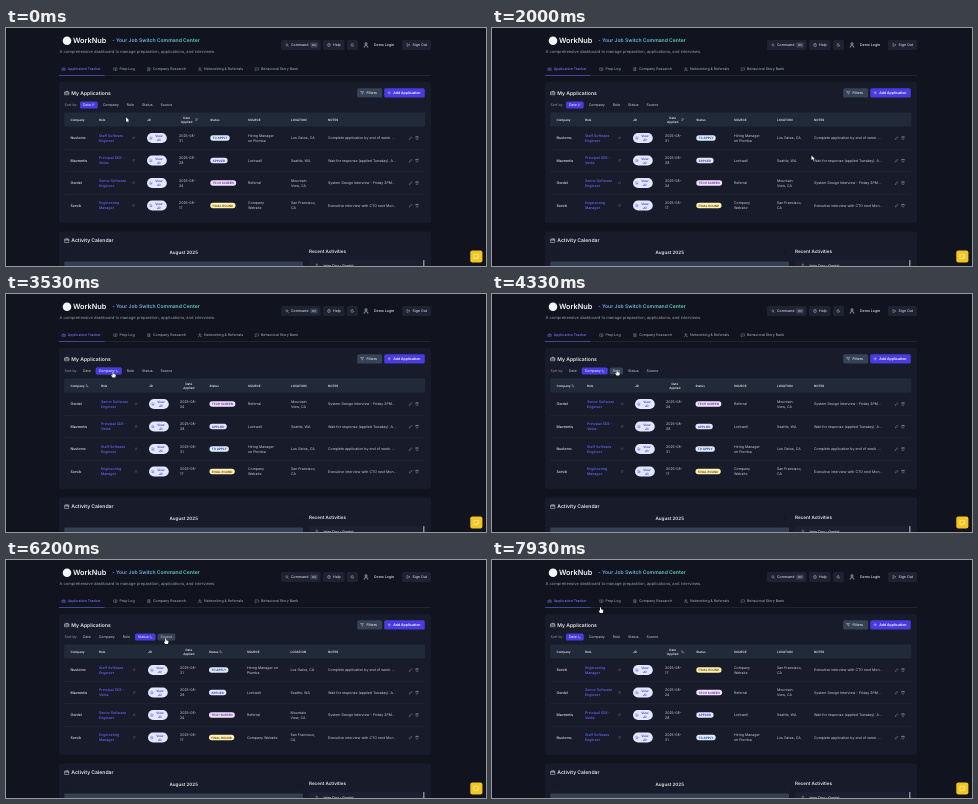
An HTML page with a canvas that plays this animation: 480 by 238 pixels, repeating every 8000 ms.

```html
<!DOCTYPE html>
<html lang="en">
<head>
<meta charset="utf-8">
<title>Application dashboard</title>
<style>
html, body { margin: 0; width: 100%; height: 100%; overflow: hidden; background: #11131f; }
canvas { display: block; width: 480px; height: 238px; }
</style>
</head>
<body>
<canvas id="stage"></canvas>
<script>
const W = 480, H = 238, LOOP = 8000;
const K = W / 1900; // stage pixels per interface pixel
const canvas = document.getElementById('stage');
const ctx = canvas.getContext('2d');
const dpr = window.devicePixelRatio || 1;
canvas.width = W * dpr;
canvas.height = H * dpr;

const C = {
  page: '#11131f', panel: '#181b29', head: '#212a39', button: '#1f2231', slate: '#364357',
  line: '#272b3b', text: '#e5e7eb', soft: '#cbd0da', muted: '#989fad',
  indigo: '#6668fa', add: '#4a3bdf'
};

const ICONS = {
  search: 'M11 4a7 7 0 1 0 0 14a7 7 0 1 0 0-14M16 16l5 5',
  help: 'M12 2a10 10 0 1 0 0 20a10 10 0 1 0 0-20M9 9q3-4 6 0q0 2-3 4M12 17v1',
  moon: 'M12 3a6 6 0 0 0 9 9a9 9 0 1 1-9-9',
  user: 'M12 3a4.5 4.5 0 1 0 0 9a4.5 4.5 0 1 0 0-9M5 21v-2q0-4 4-4h6q4 0 4 4v2',
  out: 'M9 21H4V3h5M16 17l5-5l-5-5M21 12H9',
  brief: 'M3 7h18v13H3zM8 7V4h8v3M3 13h18',
  book: 'M12 6v14M3 4h7l2 2l2-2h7v14h-7l-2 2l-2-2H3z',
  building: 'M6 3h12v18H6zM10 8h4M10 12h4M10 16h4',
  people: 'M9 4a4 4 0 1 0 0 8a4 4 0 1 0 0-8M2 21q0-6 7-6t7 6M16 4q4 4 0 8M19 15q3 2 3 6',
  chat: 'M3 4h18v13H8l-5 4z',
  filter: 'M3 4h18l-7 9v7l-4-2v-5z',
  plus: 'M12 5v14M5 12h14',
  link: 'M10 5H5v14h14v-5M14 4h6v6M20 4l-9 9',
  doc: 'M6 3h9l4 4v14H6zM9 13h6M9 17h6',
  pencil: 'M4 20l1-5L16 4l4 4L9 19z',
  trash: 'M3 6h18M6 6l1 15h10l1-15M9 6V3h6v3',
  calendar: 'M3 5h18v16H3zM3 10h18M8 2v5M16 2v5',
  left: 'M15 5l-7 7l7 7',
  right: 'M9 5l7 7l-7 7',
  asc: 'M7 21V4M4 7l3-3l3 3M14 15h3M14 20h7',
  desc: 'M7 3v17M4 17l3 3l3-3M14 4h7M14 9h3',
  note: 'M4 4h16v11l-5 5H4zM20 15h-5v5'
};
for (const name in ICONS) ICONS[name] = new Path2D(ICONS[name]);

// Columns shift a little with the sorted heading.
const COLUMNS = {
  Date: { role: 93, link: 127.5, jd: 141, date: 173, status: 204.3, source: 242, place: 285 },
  Company: { role: 95, link: 130, jd: 143, date: 174, status: 203.5, source: 242, place: 285 },
  Role: { role: 93, link: 129, jd: 143, date: 174, status: 203.5, source: 242, place: 285 },
  Status: { role: 93, link: 128, jd: 142, date: 174, status: 203, source: 241, place: 284.5 },
  Source: { role: 93, link: 128, jd: 142, date: 174, status: 203, source: 241, place: 284.5 }
};

const STATUS = [
  ['TO APPLY', '#dbeafe', '#1e3a8a'],
  ['APPLIED', '#e0e7ff', '#3730a3'],
  ['TECH SCREEN', '#eee2fd', '#6b21a8'],
  ['FINAL ROUND', '#fef4b2', '#713f12']
];

const JOBS = [
  { Company: 'Nuvlomo', Role: 'Staff Software|Engineer', Date: '2025-08-|31', Status: 0,
    Source: 'Hiring Manager|on Plomba', wide: 'Hiring Manager on|Plomba', place: 'Los Gatos, CA',
    notes: 'Complete application by end of week. ...' },
  { Company: 'Mavrentis', Role: 'Principal SDE -|Velda', Date: '2025-08-|28', Status: 1,
    Source: 'Lorkwell', place: 'Seattle, WA',
    notes: 'Wait for response (applied Tuesday). A...' },
  { Company: 'Gordel', Role: 'Senior Software|Engineer', Date: '2025-08-|24', Status: 2,
    Source: 'Referral', place: 'Mountain|View, CA',
    notes: 'System Design Interview - Friday 2PM...' },
  { Company: 'Sorvik', Role: 'Engineering|Manager', Date: '2025-08-|17', Status: 3,
    Source: 'Company|Website', wide: 'Company Website', place: 'San Francisco,|CA',
    notes: 'Executive interview with CTO next Mon...' }
];

const SORTS = [
  { at: -1000, key: 'Date', dir: -1 },
  { at: 3050, key: 'Company', dir: 1 },
  { at: 4600, key: 'Role', dir: 1 },
  { at: 5060, key: 'Status', dir: 1 },
  { at: 6450, key: 'Source', dir: 1 },
  { at: 7150, key: 'Date', dir: 1 }
];

// Pointer stops: time, x, y
const PATH = [
  [0, 120, 89.3], [300, 120, 89.3], [1000, 330.5, 130], [1900, 330.5, 130],
  [2650, 107, 78], [3700, 107, 78], [4200, 125, 76], [4750, 125, 76],
  [5000, 145, 79], [5700, 145, 79], [6100, 159.7, 78.3], [6600, 159.7, 78.3],
  [7000, 81, 78], [7500, 81, 78], [7900, 108.5, 47.3], [8000, 108.5, 47.3]
];

function setFont(size, weight) {
  ctx.font = `${weight} ${size}px Inter, sans-serif`;
  ctx.textRendering = 'geometricPrecision';
}

function textWidth(str, size, weight = 400) {
  setFont(size, weight);
  return ctx.measureText(str).width * K;
}

// y is the middle of the capitals; size is in interface pixels.
function text(str, x, y, size, color, weight = 400, align = 'left') {
  ctx.save();
  ctx.translate(x, y);
  ctx.scale(K, K);
  setFont(size, weight);
  ctx.textAlign = align;
  ctx.fillStyle = color;
  ctx.fillText(str, 0, size * 0.36);
  ctx.restore();
}

function lines(str, x, y, size, color, weight, align, gap = 5.05) {
  const parts = str.split('|');
  parts.forEach((part, i) =>
    text(part, x, y + (i - (parts.length - 1) / 2) * gap, size, color, weight, align));
}

function box(x, y, w, h, r, fill) {
  ctx.beginPath();
  ctx.roundRect(x, y, w, h, r);
  ctx.fillStyle = fill;
  ctx.fill();
}

function icon(name, x, y, size, color) {
  ctx.save();
  ctx.translate(x - size / 2, y - size / 2);
  ctx.scale(size / 24, size / 24);
  ctx.strokeStyle = color;
  ctx.lineWidth = 2.2;
  ctx.lineCap = ctx.lineJoin = 'round';
  ctx.stroke(ICONS[name]);
  ctx.restore();
}

function drawHeader() {
  ctx.fillStyle = '#f4f5f7';
  ctx.beginPath();
  ctx.arc(61, 12.8, 4.3, 0, Math.PI * 2);
  ctx.fill();
  text('WorkNub', 67, 12.8, 29, '#f4f5f7', 600);

  const tint = ctx.createLinearGradient(0, 0, 85 / K, 0);
  tint.addColorStop(0, '#74a4f2');
  tint.addColorStop(1, '#5fd6b8');
  text('- Your Job Switch Command Center', 106.3, 12.3, 20, tint, 600);
  text('A comprehensive dashboard to manage preparation, applications, and interviews.',
    53.5, 23.5, 16, C.muted);

  const button = (x, w) => box(x, 12, w, 10, 1.5, C.button);
  button(275, 39.7);
  icon('search', 281, 17, 3.6, C.soft);
  text('Command', 285, 17, 14, C.soft, 500);
  box(304.3, 14.6, 7.4, 4.8, 1, '#3a4150');
  text('⌘K', 308, 17, 11, C.soft, 400, 'center');
  button(317, 21.5);
  icon('help', 323, 17, 3.8, C.soft);
  text('Help', 327, 17, 14, C.soft, 500);
  button(341, 11);
  icon('moon', 346.3, 17, 3.8, C.soft);
  icon('user', 360, 17, 6, C.text);
  text('Demo Login', 368, 17, 14, C.text, 500);
  button(396, 29);
  icon('out', 402.2, 17, 3.8, C.soft);
  text('Sign Out', 406.5, 17, 14, C.soft, 500);
}

function drawTabs() {
  box(53, 47.3, 372, 0.35, 0, '#333849');
  box(53, 46.9, 45.5, 0.6, 0, C.indigo);
  [['brief', 'Application Tracker', 57.7], ['book', 'Prep Log', 109.5],
   ['building', 'Company Research', 143], ['people', 'Networking & Referrals', 194],
   ['chat', 'Behavioral Story Bank', 251]].forEach(([name, label, x], i) => {
    const color = i ? C.muted : '#7577fb';
    icon(name, x, 41.2, 4, color);
    text(label, x + 4, 41.2, 14, color, 500);
  });
}

function sortButtons(sort) {
  let x = 74;
  return Object.keys(COLUMNS).map(key => {
    const arrow = key === sort.key;
    const w = textWidth(key, 14) + 6 + (arrow ? 4 : 0);
    const item = { key, x, w, arrow };
    x += w + 2;
    return item;
  });
}

function drawToolbar(buttons, sort, previous, fade, hover) {
  icon('brief', 60.9, 65, 5.2, C.text);
  text('My Applications', 65.3, 65, 20, C.text, 600);
  box(351.2, 60.3, 25, 9.1, 1.5, C.slate);
  icon('filter', 356.3, 64.8, 3.8, C.text);
  text('Filters', 360.5, 64.8, 14, C.text, 500);
  box(378.2, 60.3, 40.6, 9.1, 1.5, C.add);
  icon('plus', 383.2, 64.8, 4, '#fff');
  text('Add Application', 387.2, 64.8, 14, '#fff', 600);

  text('Sort by:', 58.5, 77, 14, C.muted);
  for (const b of buttons) {
    let alpha = 0;
    if (b.key === sort.key) alpha = fade;
    else if (previous && b.key === previous.key) alpha = 1 - fade;
    if (b === hover) box(b.x, 73.4, b.w, 7.2, 1.5, C.slate);
    ctx.globalAlpha = alpha;
    box(b.x, 73.4, b.w, 7.2, 1.5, C.add);
    ctx.globalAlpha = 1;
    text(b.key, b.x + 3, 77, 14, alpha > 0.5 ? '#fff' : C.soft);
    if (b.arrow) icon(sort.dir > 0 ? 'asc' : 'desc', b.x + b.w - 4.6, 77, 3, C.text);
  }
}

function drawTable(sort) {
  const col = COLUMNS[sort.key];
  const arrow = x => icon(sort.dir > 0 ? 'asc' : 'desc', x, 91.7, 3, C.text);
  const heading = (label, x, key) => {
    text(label, x, 91.5, 12, C.text, 600);
    if (key === sort.key) arrow(x + textWidth(label, 12, 600) + 2.4);
  };
  box(58.3, 84.5, 361, 14, 1, C.head);
  heading('Company', 64.5, 'Company');
  heading('Role', col.role, 'Role');
  heading('JD', col.jd, 'JD');
  const mid = col.date + (sort.key === 'Date' ? 7.7 : 8.8);
  lines('Date|Applied', mid, 91.5, 12, C.text, 600, 'center', 4);
  if (sort.key === 'Date') arrow(mid + 10);
  heading('Status', col.status, 'Status');
  heading('SOURCE', col.source, 'Source');
  heading('LOCATION', col.place);
  heading('NOTES', 322);

  const wide = sort.key === 'Status' || sort.key === 'Source';
  const rows = [...JOBS].sort((a, b) =>
    (a[sort.key] < b[sort.key] ? -1 : 1) * sort.dir);
  rows.forEach((job, i) => {
    const y = 110 + i * 22.5;
    if (i) box(58.3, y - 11.4, 361, 0.3, 0, C.line);
    text(job.Company, 64.5, y, 14, C.text, 500);
    lines(job.Role, col.role, y, 14, C.indigo, 500);
    icon('link', col.link, y, 3, '#646b7b');

    box(col.jd, y - 5.05, 19.8, 10.1, 5.05, '#e0e7ff');
    icon('doc', col.jd + 4, y, 3.2, '#4338ca');
    lines('View|JD', col.jd + 11.8, y, 12, '#4338ca', 600, 'center', 4);

    lines(job.Date, col.date, y, 14, C.soft);
    const [label, fill, ink] = STATUS[job.Status];
    box(col.status, y - 2.7, textWidth(label, 12, 600) + 4.6, 5.4, 2.7, fill);
    text(label, col.status + 2.3, y, 12, ink, 600);
    lines(wide && job.wide || job.Source, col.source, y, 14, C.soft);
    lines(job.place, col.place, y, 14, C.soft);
    text(job.notes, 322, y, 14, C.soft);
    icon('pencil', 404.7, y, 4, C.muted);
    icon('trash', 411, y, 4, C.muted);
  });
}

function drawCalendar() {
  box(53, 203.5, 372, 50, 2, C.panel);
  icon('calendar', 60.9, 212.6, 5, C.text);
  text('Activity Calendar', 65.3, 212.6, 20, C.text, 600);
  icon('left', 63, 224.8, 3.8, '#0b0d15');
  icon('right', 292.5, 224.8, 3.8, '#0b0d15');
  text('August 2025', 177.7, 224.8, 18, C.text, 600, 'center');
  box(58.3, 233.5, 238.7, 20, 1, '#334051');
  text('Recent Activities', 303, 223.8, 18, C.text, 600);
  box(303, 232, 112, 20, 1.5, '#1d2030');
  icon('people', 311, 237.4, 4, C.muted);
  text('Intro Day - Gordel', 317.5, 237.4, 14, C.text, 500);
  box(417.2, 232, 1.2, 12, 0.6, '#a6abb5');
}

function drawNoteButton() {
  box(464.3, 222.4, 12.1, 12.1, 2, '#f2c61f');
  icon('note', 470.4, 228.5, 6.2, '#fff8dc');
}

function pointerAt(t) {
  let i = 0;
  while (i < PATH.length - 2 && t >= PATH[i + 1][0]) i++;
  const [t0, x0, y0] = PATH[i], [t1, x1, y1] = PATH[i + 1];
  const p = Math.min(1, (t - t0) / (t1 - t0));
  const e = p * p * (3 - 2 * p);
  return [x0 + (x1 - x0) * e, y0 + (y1 - y0) * e];
}

const SHAPES = {
  arrow: new Path2D('M0 0V4.6L1.1 3.6L1.9 5.3L2.7 4.9L1.9 3.3H3.4Z'),
  hand: new Path2D('M-.5 .3Q0-.4 .5 .3V2L2.3 2.5Q2.9 2.7 2.8 3.3L2.3 5.6H-.5L-1.8 3.6Q-1.6 2.7-.5 3.5Z'),
  beam: new Path2D('M-.9-2.4H.9M-.9 2.4H.9M0-2.4V2.4')
};

function drawPointer(x, y, hover) {
  const overTab = y > 35 && y < 48 && x < 300;
  const overNotes = x > 320 && x < 390 && Math.abs(y - 132) < 4;
  ctx.save();
  ctx.translate(x, y);
  if (overNotes) {
    ctx.strokeStyle = '#e5e7eb';
    ctx.lineWidth = 0.6;
    ctx.stroke(SHAPES.beam);
  } else {
    const shape = SHAPES[hover || overTab ? 'hand' : 'arrow'];
    ctx.strokeStyle = '#0a0a0f';
    ctx.lineWidth = 0.7;
    ctx.stroke(shape);
    ctx.fillStyle = '#fff';
    ctx.fill(shape);
  }
  ctx.restore();
}

function draw(t) {
  const index = SORTS.findLastIndex(s => t >= s.at);
  const sort = SORTS[index], previous = SORTS[index - 1];
  const fade = Math.min(1, (t - sort.at) / 180);
  const [px, py] = pointerAt(t);
  const buttons = sortButtons(sort);
  const hover = buttons.find(b => px > b.x && px < b.x + b.w && py > 73 && py < 81);

  ctx.setTransform(dpr, 0, 0, dpr, 0, 0);
  ctx.fillStyle = C.page;
  ctx.fillRect(0, 0, W, H);
  drawHeader();
  drawTabs();
  box(53, 54, 372, 140.7, 2, C.panel);
  drawToolbar(buttons, sort, previous, fade, hover);
  drawTable(sort);
  drawCalendar();
  drawNoteButton();
  drawPointer(px, py, hover);
}

function loop() {
  draw(performance.now() % LOOP);
  requestAnimationFrame(loop);
}
loop();
</script>
</body>
</html>
```
